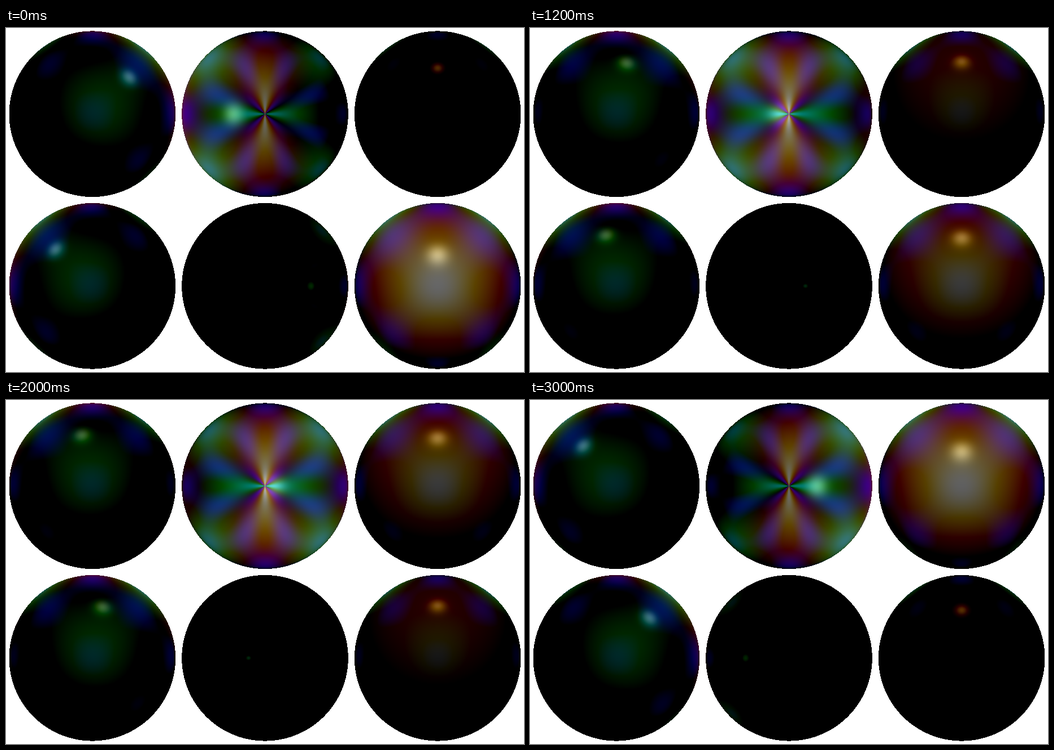
Animation of 917x611 px, one loop 3.2 s. Source, as an HTML page with a canvas:

```html
<!DOCTYPE html>
<html lang="en">
<head>
<meta charset="utf-8">
<title>Six views of a lit sphere</title>
<style>
  html, body { margin: 0; width: 100%; height: 100%; overflow: hidden; background: #fff; }
  canvas { display: block; }
</style>
</head>
<body>
<canvas id="stage" width="917" height="611"></canvas>
<script>
const W = 917, H = 611, RADIUS = 147.3;
const LOOP = 3200, STEP = 200;
const CAMERA = 2, SPREAD = Math.sqrt(CAMERA * CAMERA - 1);
const TEXTURE = 0.5, DIFFUSE = 0.35, SPECULAR = 0.36, SHININESS = 128;

// World axes: x = front, y = side, z = pole.
const VIEWS = [
  { axis: [0, 1, 0], right: [1, 0, 0], up: [0, 0, 1] },
  { axis: [0, 0, 1], right: [-1, 0, 0], up: [0, 1, 0] },
  { axis: [-1, 0, 0], right: [0, 1, 0], up: [0, 0, 1] },
  { axis: [0, -1, 0], right: [-1, 0, 0], up: [0, 0, 1] },
  { axis: [0, 0, -1], right: [1, 0, 0], up: [0, 1, 0] },
  { axis: [1, 0, 0], right: [0, 1, 0], up: [0, 0, 1] }
];

const ctx = document.getElementById("stage").getContext("2d");
const image = ctx.createImageData(W, H);
const pixels = image.data.fill(255);

const dot = (a, b) => a[0] * b[0] + a[1] * b[1] + a[2] * b[2];

function texture([x, y, z]) {
  const phi = Math.atan2(y, x), theta = Math.acos(Math.max(-1, Math.min(1, z)));
  const wave = k => Math.cos(k * phi) * Math.cos(k * theta);
  return [1 - wave(2), 1 + wave(4), 1 + wave(8)].map(v => v / 2 * TEXTURE);
}

// Visible sphere points of one view, with their fixed surface colour.
function trace({ axis, right, up }, index) {
  const cx = W * (index % 3 * 2 + 1) / 6, cy = H * (index < 3 ? 1 : 3) / 4;
  const points = [];
  for (let py = Math.floor(cy - RADIUS); py <= cy + RADIUS; py++) {
    for (let px = Math.floor(cx - RADIUS); px <= cx + RADIUS; px++) {
      const x = (px + 0.5 - cx) / RADIUS, y = (cy - py - 0.5) / RADIUS;
      const rr = x * x + y * y;
      if (rr > 1) continue;
      const t = (CAMERA - Math.sqrt(1 - rr)) / (1 + rr / (SPREAD * SPREAD));
      const u = x * t / SPREAD, v = y * t / SPREAD, w = CAMERA - t;
      const n = axis.map((a, i) => a * w + right[i] * u + up[i] * v);
      points.push({ at: (py * W + px) * 4, n, color: texture(n) });
    }
  }
  return { axis, points };
}

function shade({ axis, points }, light) {
  const facing = dot(axis, light);
  const pull = CAMERA / (2.38 + 0.28 * Math.max(0, Math.min(1, -2 * facing)));
  const center = axis.map((a, i) => a * CAMERA + light[i] * pull);
  const centerSq = dot(center, center);
  for (const { at, n, color } of points) {
    const toCenter = dot(n, center);
    const cosine = (toCenter - 1) / Math.sqrt(centerSq - 2 * toCenter + 1);
    const glow = cosine > 0 ? SPECULAR * Math.pow(cosine, SHININESS) : 0;
    const level = DIFFUSE * (dot(n, light) - 1) + glow;
    for (let c = 0; c < 3; c++) pixels[at + c] = 255 * (color[c] + level);
  }
}

const spheres = VIEWS.map(trace);
const start = performance.now();
let shown = -1;

function render(now) {
  const step = Math.floor(Math.max(0, now - start) % LOOP / STEP);
  if (step !== shown) {
    shown = step;
    const angle = Math.PI / 4 * (1 - 2 * step * STEP / LOOP);
    const light = [Math.sin(angle), 0, Math.cos(angle)];
    spheres.forEach(sphere => shade(sphere, light));
    ctx.putImageData(image, 0, 0);
  }
  requestAnimationFrame(render);
}
render(start);
</script>
</body>
</html>
```
